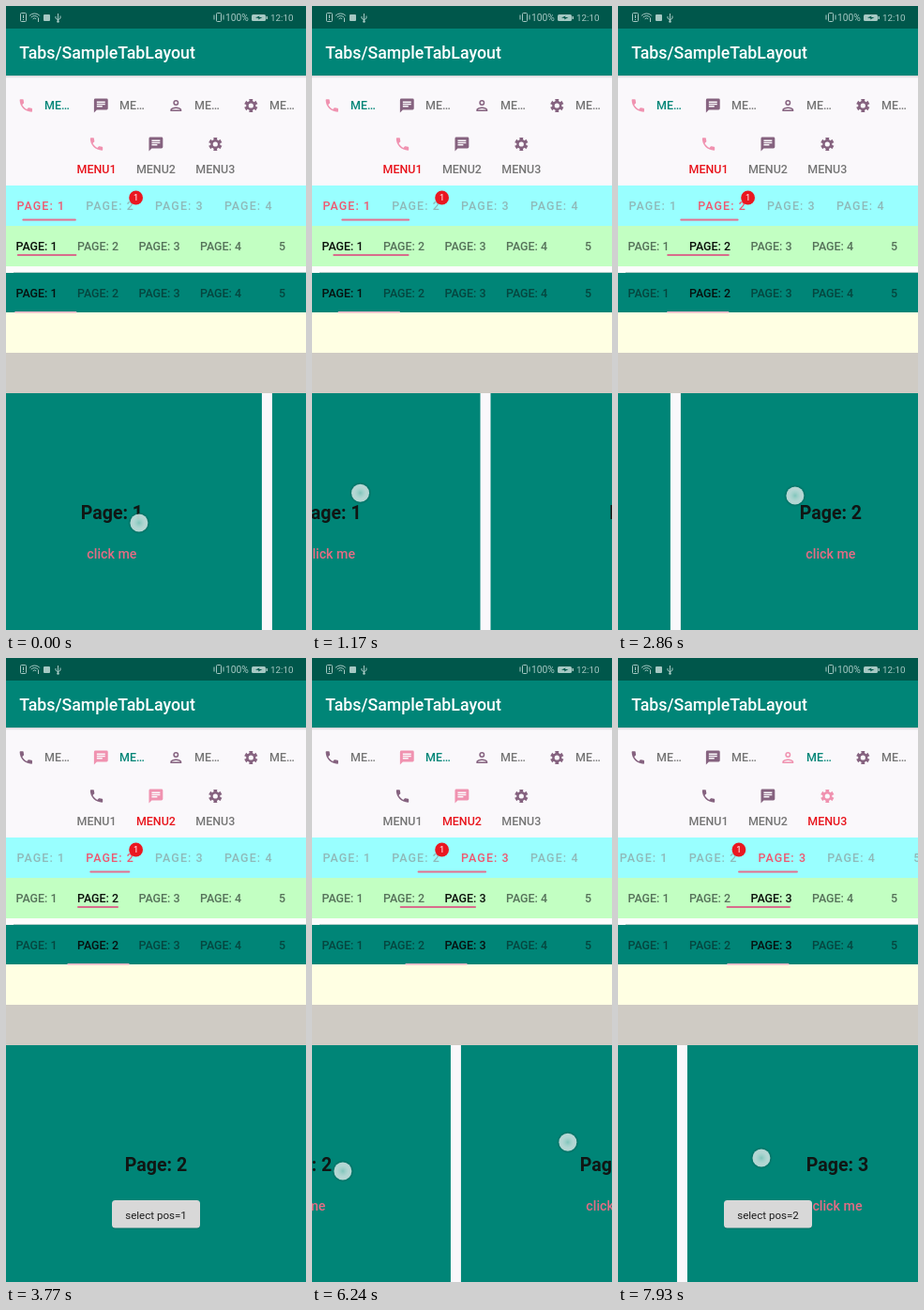
An HTML page with a canvas that plays this animation: 320 px wide and 664 px high, repeating every 8000 ms.

```html
<!DOCTYPE html>
<html lang="en">
<head>
<meta charset="utf-8">
<title>Tab layout</title>
<style>
html, body { margin: 0; width: 100%; height: 100%; overflow: hidden; background: #faf8fb; }
canvas { display: block; width: 320px; height: 664px; }
</style>
</head>
<body>
<canvas id="stage"></canvas>
<script>
const W = 320, H = 664, LOOP = 8000, PAGE = 331;
const TEAL = '#008577', PALE = '#faf8fb', PINK = '#f092b0', PLUM = '#85627f', GREY = '#757575';
const canvas = document.getElementById('stage');
const ctx = canvas.getContext('2d');
const dpr = window.devicePixelRatio || 1;
canvas.width = W * dpr;
canvas.height = H * dpr;

// Motion keys: [time, value...]
const scrollKeys = [[0, 47], [520, 96], [1950, 178], [2100, 181], [2860, 264], [3450, 319], [3640, 331],
  [5330, 331], [5460, 349], [6240, 503], [6400, 510], [7600, 573], [7930, 588], [8000, 592]];
const touches = [
  [[0, 142, 550], [520, 93, 535], [1950, 13, 502], [2040, 10, 501]],
  [[2060, 275, 512], [2140, 272, 513], [2860, 189, 521], [3450, 134, 533]],
  [[4680, 221, 579], [5200, 218, 578], [5460, 187, 572], [6240, 33, 546], [6300, 26, 545]],
  [[6190, 274, 515], [6350, 270, 516], [7930, 153, 532], [8000, 149, 533]]
];
const picks = [3450, 7560];

const clamp = (v, a = 0, b = 1) => Math.min(b, Math.max(a, v));

// Monotone cubic through the keys, column c
function sample(keys, t, c = 1) {
  const last = keys.length - 1;
  t = clamp(t, keys[0][0], keys[last][0]);
  let i = 0;
  while (i < last - 1 && t > keys[i + 1][0]) i++;
  const slope = k => (keys[k + 1][c] - keys[k][c]) / (keys[k + 1][0] - keys[k][0]);
  const tangent = k => {
    if (k === 0) return slope(0);
    if (k === last) return slope(last - 1);
    const a = slope(k - 1), b = slope(k);
    return a * b <= 0 ? 0 : 2 * a * b / (a + b);
  };
  const h = keys[i + 1][0] - keys[i][0], u = (t - keys[i][0]) / h;
  const u2 = u * u, u3 = u2 * u;
  return (2 * u3 - 3 * u2 + 1) * keys[i][c] + (u3 - 2 * u2 + u) * h * tangent(i)
    + (3 * u2 - 2 * u3) * keys[i + 1][c] + (u3 - u2) * h * tangent(i + 1);
}

function rect(x, y, w, h, color) {
  ctx.fillStyle = color;
  ctx.fillRect(x, y, w, h);
}

function round(x, y, w, h, r, color) {
  ctx.fillStyle = color;
  ctx.beginPath();
  ctx.roundRect(x, y, w, h, r);
  ctx.fill();
}

function disc(x, y, r, color) {
  ctx.fillStyle = color;
  ctx.beginPath();
  ctx.arc(x, y, r, 0, 7);
  ctx.fill();
}

function text(str, x, y, size, color, { weight = 500, align = 'center', gap = 0 } = {}) {
  ctx.font = `${weight} ${size}px Roboto, sans-serif`;
  ctx.letterSpacing = gap + 'px';
  ctx.textAlign = align;
  ctx.fillStyle = color;
  ctx.fillText(str, x, y);
}

const phone = new Path2D('M6.6 10.8c1.4 2.8 3.8 5.1 6.6 6.6l2.2-2.2c.3-.3.7-.4 1-.2 1.1.4 2.3.6 3.6.6.6 0 1 .4 1 1V20c0 .6-.4 1-1 1C10.600 21 3 13.400 3 4c0-.6.400-1 1-1h3.500c.6 0 1 .4 1 1 0 1.200.2 2.400.6 3.600.1.300 0 .7-.3 1z');
const chat = new Path2D('M20 2H4a2 2 0 0 0-2 2v18l4-4h14a2 2 0 0 0 2-2V4a2 2 0 0 0-2-2zM6 9h12v2H6zm0 3h8v2H6zm0-6h12v2H6z');
const person = new Path2D('M12 6a2 2 0 1 1 0 4 2 2 0 0 1 0-4m0 10c2.700 0 5.800 1.300 6 2H6c.2-.7 3.300-2 6-2m0-12a4 4 0 1 0 0 8 4 4 0 0 0 0-8m0 10c-2.700 0-8 1.300-8 4v2h16v-2c0-2.700-5.300-4-8-4');

function gear() {
  const p = new Path2D();
  for (let i = 0; i < 6; i++) {
    const a = i * Math.PI / 3 + Math.PI / 6;
    [[7, -.42], [9.9, -.38], [9.9, .38], [7, .42]].forEach(([r, d], k) => {
      // teeth sit on the top, bottom and diagonals
      const x = 12 + r * Math.cos(a + d * .75), y = 12 + r * Math.sin(a + d * .75);
      i + k ? p.lineTo(x, y) : p.moveTo(x, y);
    });
  }
  p.closePath();
  p.moveTo(15.5, 12);
  p.arc(12, 12, 3.5, 0, Math.PI * 2);
  return p;
}
const icons = [phone, chat, person, gear()];

function icon(shape, x, y, active) {
  const k = 17.8 / 24;
  ctx.save();
  ctx.translate(x - 12 * k, y - 12 * k);
  ctx.scale(k, k);
  ctx.fillStyle = active ? PINK : PLUM;
  ctx.fill(shape, 'evenodd');
  ctx.restore();
}

function statusBar() {
  const c = '#a6c8c3';
  rect(0, 0, W, 24, '#00574b');
  ctx.strokeStyle = c;
  ctx.lineWidth = 1;
  ctx.beginPath();
  ctx.roundRect(15.5, 7.5, 6, 9, 1);
  ctx.moveTo(18.5, 9.5);
  ctx.lineTo(18.5, 13);
  ctx.moveTo(18.5, 14);
  ctx.lineTo(18.5, 15);
  for (const r of [2.5, 5, 7.5]) {
    ctx.moveTo(30.5 + r * Math.cos(-2.4), 15.5 + r * Math.sin(-2.4));
    ctx.arc(30.5, 15.5, r, -2.4, -.74);
  }
  ctx.moveTo(34.5, 12.5);
  ctx.lineTo(34.5, 17);
  ctx.moveTo(55.5, 8);
  ctx.lineTo(55.5, 17);
  ctx.moveTo(53, 11);
  ctx.lineTo(53, 13);
  ctx.lineTo(55.5, 15);
  ctx.lineTo(58, 13);
  ctx.lineTo(58, 10.5);
  ctx.roundRect(224.5, 7.5, 5, 9, 1);
  ctx.moveTo(222, 9.5);
  ctx.lineTo(222, 14.5);
  ctx.moveTo(232, 9.5);
  ctx.lineTo(232, 14.5);
  ctx.stroke();
  disc(55.5, 16.5, 1.3, c);
  round(40, 9, 7, 7, 1, c);
  text('100%', 234, 16, 10.3, c, { weight: 400, align: 'left' });
  round(262, 9, 15, 7, 1.5, c);
  rect(277.5, 11, 1.5, 3, c);
  ctx.fillStyle = '#00574b';
  ctx.beginPath();
  ctx.moveTo(266, 12.5);
  ctx.lineTo(270.5, 10.5);
  ctx.lineTo(270, 12);
  ctx.lineTo(273.5, 12);
  ctx.lineTo(269, 14.5);
  ctx.lineTo(269.5, 13);
  ctx.fill();
  text('12:10', 282, 16, 9.9, c, { weight: 400, align: 'left' });
}

function header() {
  rect(0, 24, W, 50, TEAL);
  const g = ctx.createLinearGradient(0, 74, 0, 77);
  g.addColorStop(0, 'rgba(0,0,0,.16)');
  g.addColorStop(1, 'rgba(0,0,0,0)');
  rect(0, 74, W, 3, g);
  text('Tabs/SampleTabLayout', 14.3, 56, 17.78, '#fff', { align: 'left' });
}

function menus(sel) {
  icons.forEach((shape, i) => {
    icon(shape, 21.3 + 80 * i, 106, i === sel);
    text('ME…', 41 + 80 * i, 110.4, 12.44, i === sel ? TEAL : GREY, { align: 'left' });
  });
  [phone, chat, icons[3]].forEach((shape, i) => {
    const x = 96.5 + 63.4 * i;
    icon(shape, x, 147, i === sel);
    text('MENU' + (i + 1), x, 178.4, 12.44, i === sel ? '#e8141c' : GREY);
  });
}

const label = i => i < 4 ? 'PAGE: ' + (i + 1) : '5';

function strips(pos) {
  const sel = Math.round(pos), base = Math.floor(pos), f = pos - base;

  // Elastic indicator; the row keeps the indicator centred
  const step = 73.8, l0 = 15.5 + step * base;
  const left = l0 + step * (1 - Math.cos(f * Math.PI / 2));
  const right = l0 + 43 + step * Math.sin(f * Math.PI / 2);
  const shift = Math.max(0, (left + right) / 2 - W / 2);
  rect(0, 191, W, 43, '#99ffff');
  ctx.save();
  ctx.translate(-shift, 0);
  for (let i = 0; i < 5; i++) {
    text(label(i), i < 4 ? 11.5 + step * i : 325, 217.3, 12.44, i === sel ? '#ee5870' : '#8fb9b9', { align: 'left', gap: 1.1 });
  }
  round(left, 226.5, right - left, 2, 1, '#e4708f');
  disc(138.6, 204, 7.4, '#ea1720');
  text('1', 138.6, 207.3, 9.3, '#fff', { weight: 400 });
  ctx.restore();

  const gap = 65.5, l1 = 10.5 + gap * base;
  const a = l1 + gap * f * f, b = l1 + 44 + gap * (1 - (1 - f) ** 2.5);
  rect(0, 234, W, 43, '#c2ffc2');
  rect(0, 277, W, 7, '#fdfcfd');
  rect(8, 283, W - 8, 1, '#b7cfcb');
  rect(0, 284, W, 42, TEAL);
  for (let i = 0; i < 5; i++) {
    const x = 32.5 + gap * i;
    text(label(i), x, 260.3, 12.44, i === sel ? '#0a0f0a' : '#56725a');
    text(label(i), x, 310.3, 12.44, i === sel ? '#06110f' : '#05463f');
  }
  round(a, 264, b - a, 2, 1, '#d86c8c');
  rect(0, 326, W, 43, '#ffffe3');
  rect(gap * pos, 325, 66, 1.6, '#eab2c4');
  rect(0, 369, W, 43, '#cfcbc4');
}

function pages(scroll) {
  rect(0, 412, W, 252, PALE);
  for (let i = 0; i < 4; i++) {
    const x = i * PAGE - scroll;
    if (x > W || x < -W) continue;
    rect(x, 412, W, 252, TEAL);
    text('Page: ' + (i + 1), x + 160, 546, 19.56, '#101614', { weight: 700 });
    text('click me', x + 160, 588, 14.22, '#e56c84');
  }
}

function toast(t) {
  picks.forEach((start, i) => {
    const alpha = clamp((t - start - 30) / 200) * clamp((start + 2300 - t) / 250);
    if (alpha <= 0) return;
    ctx.globalAlpha = alpha;
    round(113, 577.5, 94, 30, 3.5, 'rgba(0,0,0,.18)');
    round(113, 577, 94, 29.5, 3.5, '#d8d8d8');
    text('select pos=' + (i + 1), 160, 597, 11.55, '#1c1c1c', { weight: 400 });
    ctx.globalAlpha = 1;
  });
}

function touchDots(t) {
  for (const keys of touches) {
    const end = keys[keys.length - 1][0];
    if (t < keys[0][0] || t > end + 60) continue;
    const x = sample(keys, t, 1), y = sample(keys, t, 2);
    const g = ctx.createRadialGradient(x, y, 8, x, y, 12);
    g.addColorStop(0, 'rgba(0,40,36,.35)');
    g.addColorStop(1, 'rgba(0,40,36,0)');
    disc(x, y, 12, g);
    disc(x, y, 9.5, 'rgba(205,230,228,.88)');
    const core = ctx.createRadialGradient(x, y, 0, x, y, 6);
    core.addColorStop(0, 'rgba(110,190,178,.75)');
    core.addColorStop(1, 'rgba(150,210,200,.15)');
    disc(x, y, 6, core);
  }
}

function draw(t) {
  const scroll = sample(scrollKeys, t);
  ctx.setTransform(dpr, 0, 0, dpr, 0, 0);
  rect(0, 0, W, H, PALE);
  statusBar();
  header();
  menus(picks.filter(p => t >= p).length);
  strips(scroll / PAGE);
  pages(scroll);
  toast(t);
  touchDots(t);
}

const began = performance.now();
function tick() {
  draw((performance.now() - began) % LOOP);
  requestAnimationFrame(tick);
}
tick();
</script>
</body>
</html>
```
